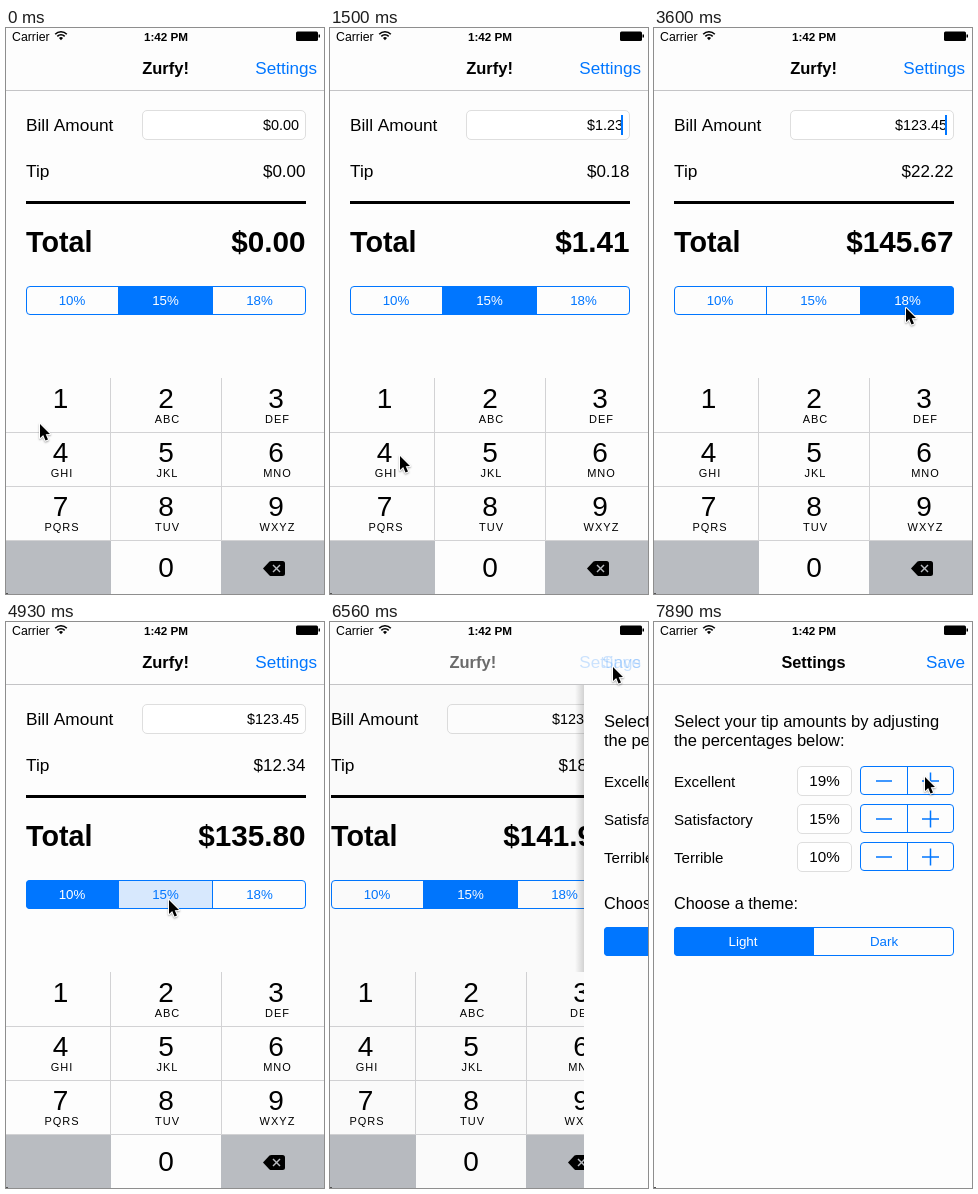
These frames come from a looping animation (318 by 566 pixels, 8 s). An HTML page with a canvas:

```html
<!DOCTYPE html>
<html lang="en">
<head>
<meta charset="utf-8">
<title>Tip calculator</title>
<style>
  html, body { margin: 0; width: 100%; height: 100%; overflow: hidden; background: #fdfdfd; }
  canvas { display: block; width: 318px; height: 566px; }
</style>
</head>
<body>
<canvas id="stage"></canvas>
<script>
const W = 318, H = 566, LOOP = 8000;
const BLUE = '#0076ff', PAPER = '#fdfdfd', GRAY = '#b9bcc1', LINE = '#d2d2d4';
const FONT = '"Liberation Sans", Arial, sans-serif';
const canvas = document.getElementById('stage');
const ctx = canvas.getContext('2d');
const dpr = window.devicePixelRatio || 1;
canvas.width = W * dpr;
canvas.height = H * dpr;

// Pointer stops: arrival time, x, y
const PATH = [
  [0, 34, 396], [100, 34, 396], [260, 62, 384], [400, 62, 384], [610, 166, 384],
  [760, 166, 384], [970, 276, 386], [1100, 276, 388], [1470, 70, 428], [1680, 70, 428],
  [1950, 158, 428], [2720, 158, 428], [3270, 252, 280], [3680, 252, 280],
  [4200, 70, 280], [4420, 70, 280], [4780, 163, 278], [5600, 163, 278],
  [6200, 283, 45], [6720, 283, 45], [7380, 271, 155], [8000, 271, 155]
];
// Keypad presses: digit, down, up
const KEYS = [[1, 280, 400], [2, 640, 770], [3, 1020, 1160], [4, 1540, 1690], [5, 1960, 2080]];
// Tip choices: segment, down, up
const PICKS = [[2, 3300, 3440], [0, 4250, 4390], [1, 4850, 5050]];
const RATES = [10, 15, 18];
const LETTERS = ['', 'ABC', 'DEF', 'GHI', 'JKL', 'MNO', 'PQRS', 'TUV', 'WXYZ'];
const COLS = [0, 104.5, 215.5, W];
const ROWS = [350, 404.5, 458.5, 512.5, H];
const PUSH = 6492, STEP_DOWN = 7600, STEP_UP = 7780;

const within = (t, a, b) => t >= a && t < b;
const clamp = v => Math.max(0, Math.min(1, v));
const smooth = v => v * v * (3 - 2 * v);

function roundEven(v) {
  const r = Math.round(v);
  return v % 1 === 0.5 && r % 2 ? r - 1 : r;
}
const money = cents => '$' + (cents / 100).toFixed(2);

function text(s, x, y, size, { align = 'left', color = '#000', weight = 400, gap = 0, alpha = 1 } = {}) {
  ctx.save();
  ctx.globalAlpha *= alpha;
  ctx.font = `${weight} ${size}px ${FONT}`;
  ctx.letterSpacing = gap + 'px';
  ctx.textAlign = align;
  ctx.fillStyle = color;
  ctx.fillText(s, x, y);
  ctx.restore();
}

function rect(x, y, w, h, color) {
  ctx.fillStyle = color;
  ctx.fillRect(x, y, w, h);
}

function line(points, color, width = 1) {
  ctx.beginPath();
  points.forEach(([x, y], i) => i ? ctx.lineTo(x, y) : ctx.moveTo(x, y));
  ctx.strokeStyle = color;
  ctx.lineWidth = width;
  ctx.stroke();
}

function roundBox(x, y, w, h, r) {
  ctx.beginPath();
  ctx.roundRect(x, y, w, h, r);
}

function field(x, y, w) {
  roundBox(x + 0.5, y + 0.5, w - 1, 29, 4.5);
  ctx.fillStyle = '#fff';
  ctx.fill();
  ctx.strokeStyle = '#dedede';
  ctx.lineWidth = 1;
  ctx.stroke();
}

// Outlined bar split at edges; solid and faint name the filled cells
function splitBar(edges, y, solid, faint = -1) {
  const x = edges[0], w = edges[edges.length - 1] - x;
  const fillCell = (i, color) => {
    if (i >= 0) rect(edges[i], y, edges[i + 1] - edges[i], 29, color);
  };
  ctx.save();
  roundBox(x, y, w, 29, 4);
  ctx.clip();
  fillCell(solid, BLUE);
  fillCell(faint, 'rgba(0,118,255,.15)');
  ctx.restore();
  edges.slice(1, -1).forEach(e => line([[e, y], [e, y + 29]], BLUE));
  roundBox(x + 0.5, y + 0.5, w - 1, 28, 3.5);
  ctx.strokeStyle = BLUE;
  ctx.lineWidth = 1;
  ctx.stroke();
}

function caretAlpha(t) {
  if (t < 120) return 0;
  if (t < 2550) return 1;
  const u = (t - 2700) % 1000;
  if (u < 100) return clamp(0.45 - u / 200);
  if (u < 430) return 0;
  if (u < 530) return (u - 430) / 100;
  return clamp(1.45 - Math.max(0, u - 900) / 100);
}

function keypad(t) {
  rect(0, 350, W, 216, PAPER);
  rect(0, 512, 105, 54, GRAY);
  rect(215, 512, 103, 54, GRAY);
  for (let n = 1; n <= 9; n++) {
    const c = (n - 1) % 3, r = Math.floor((n - 1) / 3);
    if (KEYS.some(([d, a, b]) => d === n && within(t, a, b)))
      rect(COLS[c], ROWS[r], COLS[c + 1] - COLS[c], ROWS[r + 1] - ROWS[r], GRAY);
    const x = [54.5, 160, 270][c], y = 380 + 54 * r;
    text(n, x, y, 28, { align: 'center' });
    text(LETTERS[n - 1], x + 1.5, y + 15, 11, { align: 'center', gap: 1 });
  }
  text('0', 160, 549, 28, { align: 'center' });
  ROWS.slice(1, 4).forEach(y => line([[0, y], [W, y]], LINE));
  COLS.slice(1, 3).forEach(x => line([[x, 350], [x, 512]], LINE));

  ctx.beginPath();
  ctx.moveTo(257, 540.5);
  ctx.lineTo(263.5, 533.6);
  ctx.quadraticCurveTo(264.3, 533, 265.5, 533);
  ctx.arcTo(279, 533, 279, 548, 2.5);
  ctx.arcTo(279, 548, 264, 548, 2.5);
  ctx.lineTo(265.5, 548);
  ctx.quadraticCurveTo(264.3, 548, 263.5, 547.4);
  ctx.closePath();
  ctx.fillStyle = '#000';
  ctx.fill();
  line([[267, 537], [274, 544]], GRAY, 1.4);
  line([[274, 537], [267, 544]], GRAY, 1.4);
}

function calculator(t) {
  const bill = KEYS.reduce((sum, [d, , up]) => t >= up ? sum * 10 + d : sum, 0);
  const chosen = PICKS.reduce((seg, [s, , up]) => t >= up ? s : seg, 1);
  const pressed = PICKS.find(([, a, b]) => within(t, a, b));
  const exact = bill * RATES[chosen] / 100;

  text('Bill Amount', 20, 103, 17.3);
  field(136, 82, 164);
  text(money(bill), 293, 102, 14.4, { align: 'right' });
  ctx.globalAlpha = caretAlpha(t);
  rect(291, 87, 2, 20, BLUE);
  ctx.globalAlpha = 1;
  text('Tip', 20, 149, 17.3);
  text(money(roundEven(exact)), 299.5, 149, 17, { align: 'right' });
  rect(20, 173, 280, 3, '#000');
  text('Total', 20, 223.5, 28.7, { weight: 700 });
  text(money(roundEven(bill + exact)), 299.5, 223.5, 29.7, { align: 'right', weight: 700 });

  splitBar([20, 112.5, 206.5, 300], 258, chosen, pressed ? pressed[0] : -1);
  RATES.forEach((r, i) => text(r + '%', [66, 159.5, 253.5][i], 277, 13.3,
    { align: 'center', color: i === chosen ? '#fff' : BLUE }));
  keypad(t);
}

function settings(t) {
  rect(0, 0, W, H, PAPER);
  text('Select your tip amounts by adjusting', 20, 105, 16.5);
  text('the percentages below:', 20, 123.5, 16.5);
  const levels = [['Excellent', t < STEP_DOWN ? 18 : 19], ['Satisfactory', 15], ['Terrible', 10]];
  levels.forEach(([name, rate], i) => {
    const y = 144 + 38 * i;
    const held = i === 0 && within(t, STEP_DOWN, STEP_UP);
    text(name, 20, y + 21, 15.1);
    field(143, y, 55);
    text(rate + '%', 170.5, y + 20, 15.2, { align: 'center' });
    splitBar([206, 253.5, 300], y, -1, held ? 1 : -1);
    line([[222, y + 15], [238, y + 15]], BLUE, 1.5);
    line([[268, y + 15], [285, y + 15]], BLUE, 1.5);
    line([[276.5, y + 6.5], [276.5, y + 23.5]], BLUE, 1.5);
  });
  text('Choose a theme:', 20, 287, 16.3);
  splitBar([20, 159.5, 300], 305, 0);
  text('Light', 89, 324, 13.4, { align: 'center', color: '#fff' });
  text('Dark', 230, 324, 13.3, { align: 'center', color: BLUE });
}

function navBar(t, p) {
  rect(0, 0, W, 62, PAPER);
  rect(0, 62, W, 1, '#c4c4c6');
  const title = { align: 'center', weight: 700 };
  const action = { align: 'right', color: BLUE };
  if (p < 1) {
    text('Zurfy!', 159.5 - 83 * p, 46, 16.5, { ...title, alpha: clamp(1 - 2.1 * p) });
    const dim = t >= 6340 ? 0.25 : 1;
    text('Settings', 311, 46, 17.1, { ...action, alpha: dim * (1 - p) });
  }
  if (p > 0) {
    text('Settings', 159.5 + 110 * (1 - p), 46, 16.3, { ...title, alpha: clamp((p - 0.25) / 0.75) });
    text('Save', 311, 46, 17.1, { ...action, alpha: p });
  }
}

function statusBar() {
  text('Carrier', 6, 12.5, 12.3);
  text('1:42 PM', 160, 12.5, 11.7, { align: 'center', weight: 700 });
  ctx.strokeStyle = ctx.fillStyle = '#000';
  ctx.lineWidth = 1.6;
  for (const r of [8.2, 5.2]) {
    ctx.beginPath();
    ctx.arc(55, 12, r, -Math.PI * 0.75, -Math.PI * 0.25);
    ctx.stroke();
  }
  ctx.beginPath();
  ctx.moveTo(55, 12.3);
  ctx.arc(55, 12, 2.8, -Math.PI * 0.75, -Math.PI * 0.25);
  ctx.fill();
  roundBox(290, 3.5, 22, 9.5, 1.5);
  ctx.fill();
  rect(312.5, 6.5, 1.5, 3, '#000');
}

function pointer(t) {
  const i = Math.max(1, PATH.findIndex(s => s[0] > t));
  const [t0, x0, y0] = PATH[i - 1], [t1, x1, y1] = PATH[i];
  const k = smooth((t - t0) / (t1 - t0));
  ctx.save();
  ctx.translate(x0 + (x1 - x0) * k, y0 + (y1 - y0) * k);
  ctx.beginPath();
  [[0, 0], [0, 14], [3.2, 11], [5.5, 16.6], [8, 15.5], [5.7, 10.2], [10, 10]]
    .forEach(([x, y]) => ctx.lineTo(x, y));
  ctx.closePath();
  ctx.lineJoin = 'round';
  ctx.lineWidth = 2;
  ctx.strokeStyle = '#fff';
  ctx.shadowColor = 'rgba(0,0,0,.35)';
  ctx.shadowBlur = 2 * dpr;
  ctx.shadowOffsetY = dpr;
  ctx.stroke();
  ctx.shadowColor = 'transparent';
  ctx.fillStyle = '#000';
  ctx.fill();
  ctx.restore();
}

// Critically damped slide between the two screens
function pushProgress(t) {
  if (t < PUSH) return 0;
  if (t > PUSH + 660) return 1;
  const w = 12 * (t - PUSH) / 1000;
  return 1 - (1 + w) * Math.exp(-w);
}

function draw(t) {
  const p = pushProgress(t);
  ctx.setTransform(dpr, 0, 0, dpr, 0, 0);
  rect(0, 0, W, H, PAPER);
  if (p < 1) {
    ctx.save();
    ctx.translate(-Math.round(96 * p), 0);
    calculator(t);
    ctx.restore();
  }
  if (p > 0) {
    const x = Math.round(W * (1 - p));
    if (p < 1) {
      rect(0, 0, W, H, `rgba(0,0,0,${0.06 * p})`);
      const shade = ctx.createLinearGradient(x - 9, 0, x, 0);
      shade.addColorStop(0, 'rgba(0,0,0,0)');
      shade.addColorStop(1, `rgba(0,0,0,${0.2 * (1 - p)})`);
      rect(x - 9, 63, 9, 287, shade);
    }
    ctx.save();
    ctx.translate(x, 0);
    settings(t);
    ctx.restore();
  }
  navBar(t, p);
  statusBar();
  rect(0, 565, 2, 1, '#555');
  pointer(t);
}

function tick() {
  draw(performance.now() % LOOP);
  requestAnimationFrame(tick);
}
tick();
</script>
</body>
</html>
```
